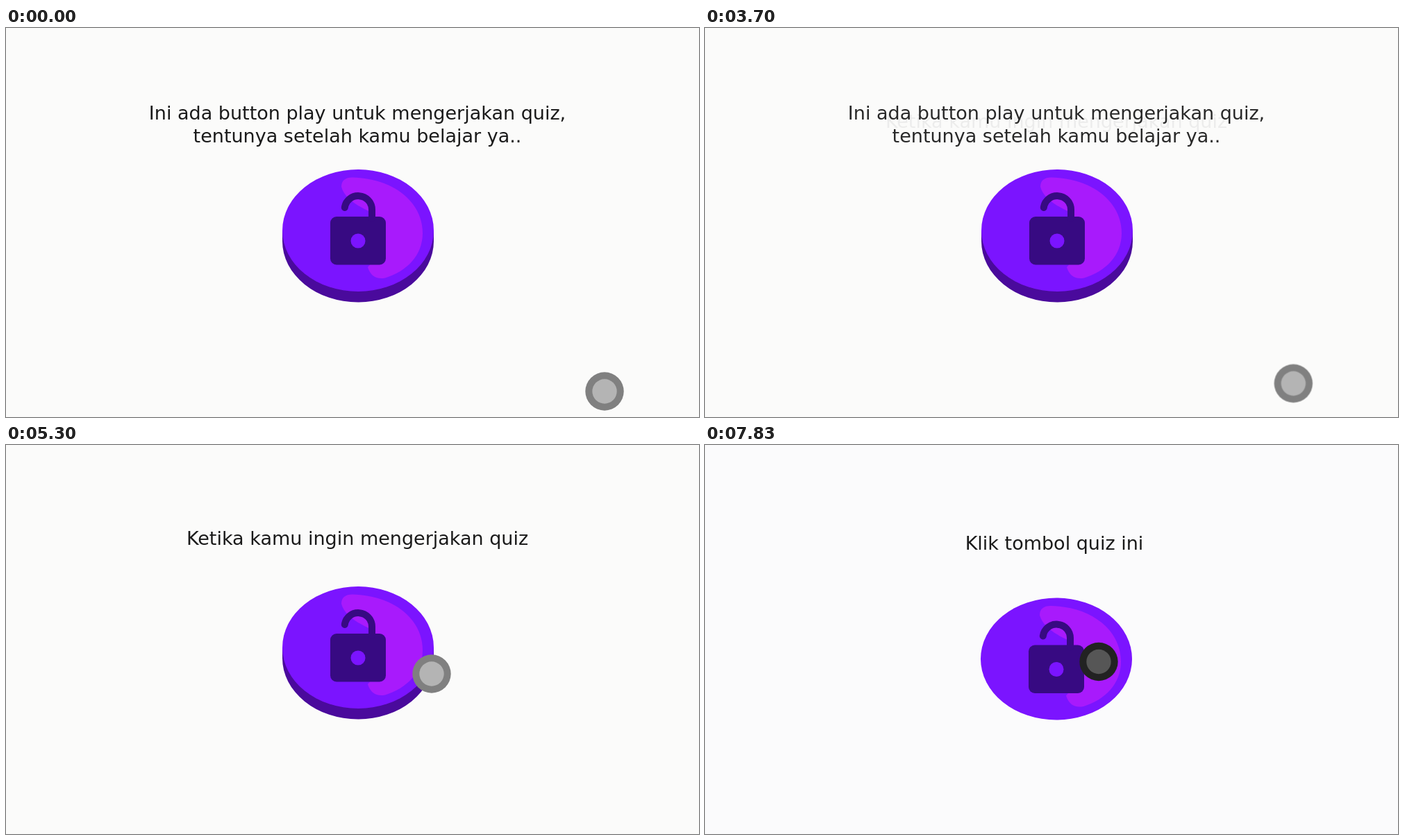
An HTML page that plays this animation: 998x561 px, repeating every 8 s.

```html
<!DOCTYPE html>
<html lang="id">
<head>
<meta charset="utf-8">
<title>Tombol quiz</title>
<style>
  html, body { margin: 0; width: 100%; height: 100%; overflow: hidden; background: #fbfbfa; }
  svg { display: block; width: 998px; height: 561px; }
  text {
    font: 27px "DejaVu Sans", sans-serif;
    text-anchor: middle;
    fill: #1a1a1a;
  }
  .ask-old, .ask-new, .cursor, .pressed { animation: 8s linear infinite; }
  .ask-old { animation-name: leave; }
  .ask-new { animation-name: enter; }
  .cursor { animation-name: glide; }
  .pressed { animation-name: dissolve; }

  @keyframes leave {
    0%, 45.9% { opacity: 1; animation-timing-function: cubic-bezier(.61, 1, .88, 1); }
    55.9%, 100% { opacity: 0; }
  }
  @keyframes enter {
    0%, 45.9% { opacity: 0; animation-timing-function: cubic-bezier(.61, 1, .88, 1); }
    55.9%, 100% { opacity: 1; }
  }
  @keyframes glide {
    0%, 45.9% {
      transform: translate(862px, 524px);
      animation-timing-function: cubic-bezier(.61, 1, .88, 1);
    }
    55.9%, 100% { transform: translate(613px, 330px); }
  }
  @keyframes dissolve {
    0%, 82.5% { opacity: 0; }
    92.5%, 100% { opacity: 1; }
  }
</style>
</head>
<body>
<svg viewBox="0 0 998 561">
  <defs>
    <g id="face">
      <ellipse cx="507" cy="292" rx="109" ry="88" fill="#7b14ff"/>
      <path fill="#a81afc" d="M483 229 Q483 215.5 499 215.5 C560 217 600 252 600 296
        C600 328 577 351 546 360.5 Q527 364 521 345
        C540 325 545 285 522 264 C508 257 488 247 483 229Z"/>
      <rect x="467" y="272" width="80" height="69.5" rx="9" fill="#370a82"/>
      <path d="M487.8 259 A19.7 19.7 0 0 1 527 261.7 V275" fill="none" stroke="#370a82"
        stroke-width="10" stroke-linecap="round"/>
      <circle cx="507" cy="307" r="10.5" fill="#7b14ff"/>
    </g>
  </defs>

  <rect width="998" height="561" fill="#fbfbfa"/>
  <path d="M398 292 V307.5 A109 88 0 0 0 616 307.5 V292Z" fill="#4a0a9c"/>
  <use href="#face"/>
  <g class="ask-old">
    <text x="506" y="132">Ini ada button play untuk mengerjakan quiz,</text>
    <text x="506" y="165">tentunya setelah kamu belajar ya..</text>
  </g>
  <text class="ask-new" x="506" y="144">Ketika kamu ingin mengerjakan quiz</text>
  <g class="cursor">
    <circle r="27.7" fill="#808080"/>
    <circle r="17.7" fill="#b4b4b4"/>
  </g>

  <g class="pressed">
    <rect width="998" height="561" fill="#fbfbfc"/>
    <use href="#face" x="-1" y="16.5"/>
    <text x="503" y="151">Klik tombol quiz ini</text>
    <g transform="translate(567 312.5)">
      <circle r="27.7" fill="#222"/>
      <circle r="17.7" fill="#565656"/>
    </g>
  </g>
</svg>
</body>
</html>
```
